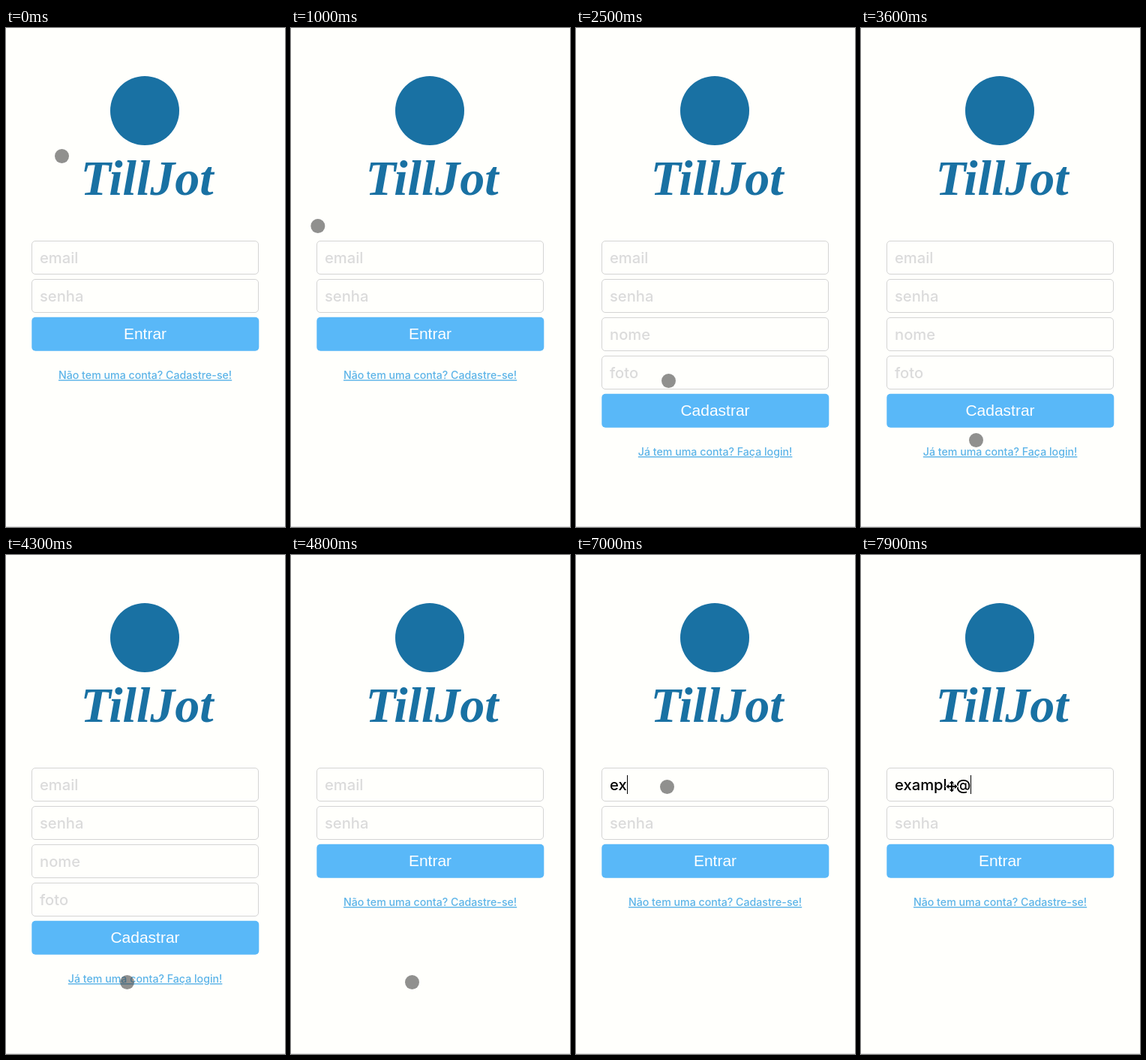
An HTML page for the animation above (8000 ms loop, 372 by 664 pixels).

```html
<!DOCTYPE html>
<html lang="pt">
<head>
<meta charset="utf-8">
<title>Login</title>
<style>
  html, body { margin: 0; width: 100%; height: 100%; overflow: hidden; background: #fffffc; }
  svg { display: block; width: 372px; height: 664px; }
  .brand { font: italic bold 66px "Liberation Serif", serif; fill: #1971a3; text-anchor: middle; }
  .box { fill: #fffffc; stroke: #d4d4d4; }
  .hint, .typed { font: 500 20.2px Inter, sans-serif; fill: #dbdbdb; }
  .typed { fill: #000; }
  .button { fill: #59b8f8; }
  .label { font: 21px "Liberation Sans", sans-serif; fill: #fff; text-anchor: middle; }
  .link { font: 500 14.2px Inter, sans-serif; fill: #5cb4e8; text-anchor: middle; text-decoration: underline; }
</style>
</head>
<body>
<svg viewBox="0 0 372 664">
  <rect width="372" height="664" fill="#fffffc"/>
  <rect y="663" width="372" height="1" fill="#dedede"/>
  <circle cx="185" cy="110" r="46" fill="#1971a3"/>
  <text class="brand" x="188" y="222">TillJot</text>
  <g id="fields"></g>
  <g id="action">
    <rect class="button" x="34.3" y="384.7" width="303" height="45" rx="5"/>
    <text class="label" id="label" x="185.5" y="414"></text>
    <text class="link" id="link" x="185.6" y="467"></text>
  </g>
  <text class="typed" id="typed" x="45" y="313"></text>
  <rect id="caret" y="293" width="1" height="25"/>
  <circle id="touch" r="9.5" fill="#3c3c3a" fill-opacity=".57"/>
  <path id="mover" transform="translate(121 308)" stroke="#fff" stroke-width="2" paint-order="stroke"
    d="M0-7.5L3-4H1V-1H4V-3L7.5 0L4 3V1H1V4H3L0 7.5L-3 4H-1V1H-4V3L-7.5 0L-4-3V-1H-1V-4H-3Z"/>
</svg>
<script>
const LOOP = 8000, TICK = 100;
const WORD = "example@", TYPE_START = 6700, TYPE_TIME = 1200;
const $ = id => document.getElementById(id);
const show = (el, on) => el.setAttribute("visibility", on ? "visible" : "hidden");

$("fields").innerHTML = ["email", "senha", "nome", "foto"].map((name, i) =>
  `<g><rect class="box" x="34.5" y="${283.5 + 51 * i}" width="302" height="44" rx="4.5"/>
   <text class="hint" x="45" y="${313 + 51 * i}">${name}</text></g>`).join("");
const fields = [...$("fields").children];
const hint = fields[0].querySelector("text");

// Pointer glides: when each starts, how many ticks it takes, where it ends
const glides = [
  { at: 500, ticks: 3, x: 42.5, y: 223.5 },
  { at: 900, ticks: 6, x: 22.5, y: 343.5 },
  { at: 1600, ticks: 2, x: 75.5, y: 450.5 },
  { at: 1900, ticks: 2, x: 114.5, y: 469.5 },
  { at: 2300, ticks: 2, x: 123.5, y: 469.5 },
  { at: 3100, ticks: 2, x: 133.5, y: 507.5 },
  { at: 3400, ticks: 3, x: 153.5, y: 548.5 },
  { at: 3800, ticks: 3, x: 161.5, y: 568.5 },
  { at: 5200, ticks: 2, x: 136.5, y: 367.5 },
  { at: 5500, ticks: 2, x: 121.5, y: 308.5 }
];

function touchAt(t) {
  let x = 74.5, y = 170.5;
  for (const g of glides) {
    if (t < g.at) break;
    const k = Math.min(1, ((t - g.at) / TICK + 1) / g.ticks);
    x += (g.x - x) * k;
    y += (g.y - y) * k;
  }
  return [x, y];
}

function typedAt(t) {
  if (t < TYPE_START) return "";
  const p = (t - TYPE_START) / TYPE_TIME;
  return WORD.slice(0, 1 + Math.floor(p * (WORD.length - 1)));
}

function render(ms) {
  const t = Math.floor(ms % LOOP / TICK) * TICK;

  const signup = t >= 2400 && t < 4800;
  fields.forEach((f, i) => f.setAttribute("display", i < 2 || signup ? "inline" : "none"));
  $("action").setAttribute("transform", `translate(0 ${signup ? 102 : 0})`);
  $("label").textContent = signup ? "Cadastrar" : "Entrar";
  $("link").textContent = signup ? "Já tem uma conta? Faça login!" : "Não tem uma conta? Cadastre-se!";

  const text = typedAt(t);
  $("typed").textContent = text;
  show(hint, !text);
  const width = text ? $("typed").getComputedTextLength() : 0;
  $("caret").setAttribute("x", 45 + Math.round(width));
  show($("caret"), text || (t >= 5800 && t < 6400));

  const [x, y] = touchAt(t);
  $("touch").setAttribute("cx", x);
  $("touch").setAttribute("cy", y);
  show($("touch"), t < 7800);
  show($("mover"), t >= 7800);
}

const begin = performance.now();
function frame() {
  render(performance.now() - begin);
  requestAnimationFrame(frame);
}
frame();
</script>
</body>
</html>
```
